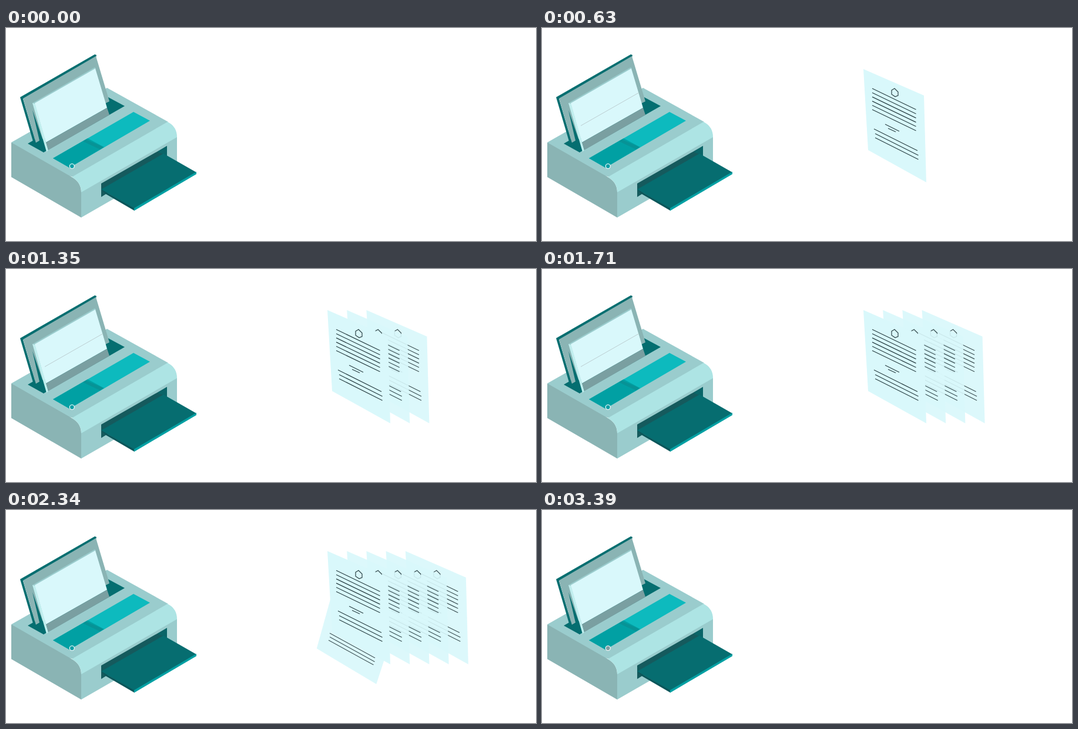
An HTML page for the animation above (4500 ms loop, 902 by 363 pixels).

```html
<!DOCTYPE html>
<html lang="en">
<head>
<meta charset="utf-8">
<title>Printer</title>
<style>
html, body { margin: 0; width: 100%; height: 100%; overflow: hidden; background: #fff; }
svg { display: block; width: 902px; height: 363px; }
</style>
</head>
<body>
<svg viewBox="0 0 902 363">
  <defs>
    <clipPath id="outlet"><path d="M0 371L902 -152V371Z"/></clipPath>
    <clipPath id="face"><path d="M49 128L152 69L172 136L68 195Z"/></clipPath>
    <g id="page">
      <path d="M0 0L103 45L107 193L8 138Z" fill="#d9f8fb"/>
      <g id="print" fill="none" stroke="#2b4145" stroke-width="1.2">
        <path d="M48 36L53 33L59 39V45L54 47L48 43Z"/>
      </g>
    </g>
  </defs>

  <!-- body -->
  <path d="M9 195L172 102L276 160L115 254L60 240Z" fill="#9acccd"/>
  <path d="M9 195L112 254Q128 263 128 280V323L9 254Z" fill="#8ab4b4"/>
  <path d="M128 279L291 185V229L128 323Z" fill="#9acccd"/>
  <path d="M112 254L275 160Q291 168 291 186L128 280Q128 263 112 254Z" fill="#ade4e4"/>

  <!-- paper support -->
  <path d="M37 197L174 118L202 133L64 212Z" fill="#056e70"/>
  <path d="M24 118L151 45L154 46L153 50L29 121L51 196L46 193Z" fill="#056e70"/>
  <path d="M29 120L153 48L176 125L170 128L57 192L51 196Z" fill="#8ab4b4"/>
  <path d="M45 140L66 200L64 212L50 196L57 192Z" fill="#056e70"/>

  <!-- blank stack -->
  <path d="M45 128L49 127L72 208L69 211Z" fill="#c0eeee"/>
  <path d="M45 128L151 67L153 69L49 129Z" fill="#9acccd"/>
  <path d="M49 128L152 69L172 136L68 195Z" fill="#d9f8fb"/>
  <path d="M68 195L172 136L176 148L72 208Z" fill="#7a9fa1"/>
  <g clip-path="url(#face)">
    <path id="feed" d="M52 126L152 69" stroke="#bccdd0" stroke-width="1"/>
  </g>

  <!-- control panel -->
  <path d="M80 222L217 143L245 158L108 238Z" fill="#0dbabe"/>
  <path d="M80 222L139 188L167 203L108 238Z" fill="#01a0a3"/>
  <path d="M131 193L136 190L166 203L160 207Z" fill="#079396"/>
  <circle id="led" cx="112.3" cy="235.5" r="4" stroke="#fff" stroke-width="1.2"/>

  <!-- output tray -->
  <path d="M162 265L274 201V218L170 283L162 288Z" fill="#155a5d"/>
  <path d="M258 211L274 201V218Z" fill="#0a6568"/>
  <path d="M162 275L268 214L324 246L218 308Z" fill="#066d70"/>
  <path d="M162 275L218 307V311L170 283Z" fill="#0a565a"/>
  <path d="M218 307L324 245V249L218 311.500Z" fill="#01a0a3"/>

  <g id="stack"></g>
</svg>
<script>
const NS = 'http://www.w3.org/2000/svg';
const LOOP = 4500, STEP = 30, START = 60, PERIOD = 360, COUNT = 6, GAP = 33.2;
const REST = { at: [547, 70], across: [103, 45], down: [8, 138] };
const FLAT = { at: [285, 229], across: [120, 69], down: [-98, 57] };
const $ = id => document.getElementById(id);
const clamp = x => Math.max(0, Math.min(1, x));
const part = (t, from, to) => clamp((t - from) / (to - from));
const mix = (a, b, p) => a.map((v, i) => v + (b[i] - v) * p);

function add(parent, tag, attrs) {
  const el = document.createElementNS(NS, tag);
  for (const key in attrs) el.setAttribute(key, attrs[key]);
  parent.appendChild(el);
  return el;
}

function rule(x1, y1, x2, y2) {
  add($('print'), 'line', { x1, y1, x2, y2 });
}
for (let i = 0; i < 6; i++) rule(15, 33 + 7.2 * i, 89.500, 69 + 7.2 * i);
rule(37, 94, 61, 106);
rule(42, 101, 55, 107);
rule(18, 102, 92, 139);
rule(20, 110, 93.5, 147);
rule(20, 117, 93.5, 154);

// Later pages lie behind earlier ones.
const pages = [];
for (let k = COUNT - 1; k >= 0; k--) {
  const wrap = add($('stack'), 'g', {});
  pages[k] = { wrap, sheet: add(wrap, 'use', { href: '#page' }) };
}

function matrix(at, across, down) {
  const [rx, ry] = REST.across, [sx, sy] = REST.down;
  const det = rx * sy - sx * ry;
  const row = i => [(across[i] * sy - down[i] * ry) / det, (down[i] * rx - across[i] * sx) / det];
  const [a, c] = row(0), [b, d] = row(1);
  return `matrix(${[a, b, c, d, at[0], at[1]]})`;
}

function placePage(k, t) {
  const { wrap, sheet } = pages[k];
  const phase = t - START - k * PERIOD;
  const shown = phase > 210 && t < 3390;
  wrap.setAttribute('visibility', shown ? 'visible' : 'hidden');
  if (!shown) return;

  const slide = 1.2 * (1 - part(phase, 210, 420));
  const fly = 1 - (1 - part(phase, 420, 570)) ** 2;
  const gather = 1 - part(t, 2730, 3294) ** 3;
  const sweep = -223 * part(t, 3270, 3360);
  const from = FLAT.at.map((v, i) => v - slide * FLAT.across[i]);
  const to = [REST.at[0] + k * GAP * gather + sweep, REST.at[1]];
  sheet.setAttribute('transform', matrix(
    mix(from, to, fly),
    mix(FLAT.across, REST.across, fly),
    mix(FLAT.down, REST.down, fly)));
  if (fly < 1) wrap.setAttribute('clip-path', 'url(#outlet)');
  else wrap.removeAttribute('clip-path');
  const solid = k ? 0.9 + 0.07 * part(t, 2400, 2460) : 1;
  wrap.setAttribute('opacity', solid * (1 - 0.6 * part(t, 3270, 3390)));
}

function draw(time) {
  const t = Math.floor((time % LOOP) / STEP) * STEP;
  const feeding = t >= START && t < START + COUNT * PERIOD;
  const pull = ((t - START) % PERIOD) / PERIOD;
  $('feed').setAttribute('visibility', feeding ? 'visible' : 'hidden');
  $('feed').setAttribute('transform', `translate(${24 * pull} ${69.5 * pull})`);
  const lit = t < 2580 && (t + 120) % 600 < 300;
  $('led').setAttribute('fill', lit ? '#0f9fa6' : '#7f9ea3');
  for (let k = 0; k < COUNT; k++) placePage(k, t);
}

const begin = performance.now();
function tick() {
  draw(performance.now() - begin);
  requestAnimationFrame(tick);
}
tick();
</script>
</body>
</html>
```
